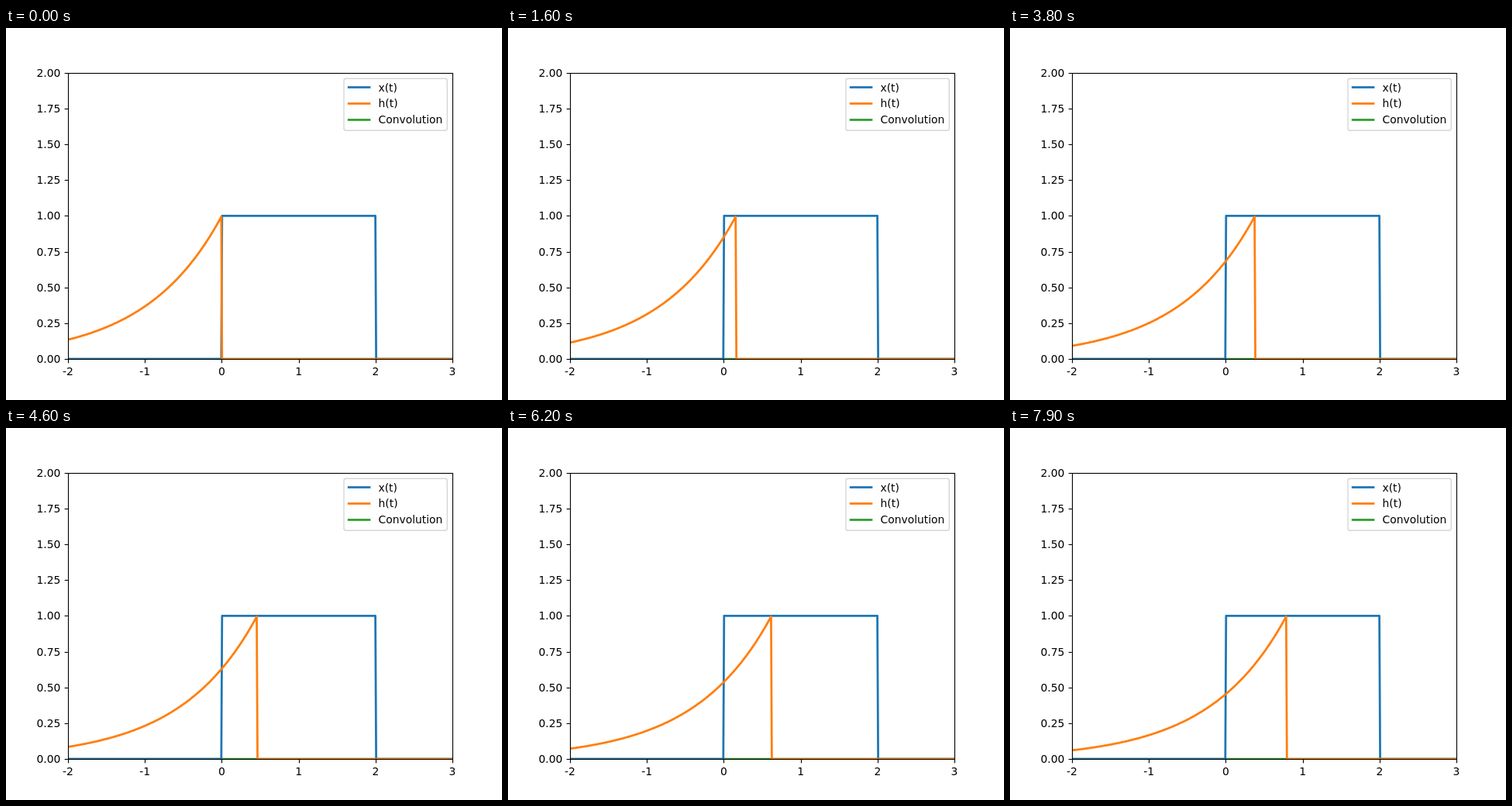
These frames come from a looping animation (640 by 480 pixels, 8 s). An HTML page:

```html
<!DOCTYPE html>
<html lang="en">
<head>
<meta charset="utf-8">
<title>Convolution</title>
<style>
  html, body { margin: 0; width: 100%; height: 100%; overflow: hidden; background: #fff; }
  svg { display: block; width: 640px; height: 480px; }
  text { font: 13.89px "DejaVu Sans", sans-serif; fill: #000; }
  .curve { fill: none; stroke-width: 2.78; stroke-linejoin: round; stroke-linecap: square; }
  .axis { fill: none; stroke: #000; stroke-width: 1.11; }
</style>
</head>
<body>
<svg id="plot" viewBox="0 0 640 480">
  <clipPath id="area"><rect x="80" y="58" width="496" height="370"/></clipPath>
  <g id="curves" clip-path="url(#area)"></g>
  <g id="axes"></g>
  <g id="legend"></g>
</svg>
<script>
const BLUE = '#1f77b4', ORANGE = '#ff7f0e', GREEN = '#2ca02c';
const SAMPLES = 500, STEP_MS = 100, STEPS = 80;
const px = t => 80 + (t + 2) * 99.2;
const py = v => 427.2 - v * 184.8;
const snap = p => Math.round(p) + 0.5;

function add(parent, tag, attrs, content = '') {
  const el = document.createElementNS('http://www.w3.org/2000/svg', tag);
  for (const key in attrs) el.setAttribute(key, attrs[key]);
  el.textContent = content;
  document.getElementById(parent).append(el);
  return el;
}

// Samples a function on the even grid from -2 to 3.
function trace(fn) {
  let d = '';
  for (let i = 0; i < SAMPLES; i++) {
    const t = -2 + 5 * i / (SAMPLES - 1);
    d += (i ? 'L' : 'M') + px(t).toFixed(2) + ' ' + py(fn(t)).toFixed(2);
  }
  return d;
}

const curve = (color, fn) => add('curves', 'path', { class: 'curve', stroke: color, d: trace(fn) });
const pulse = t => (t >= 0 && t <= 2 ? 1 : 0);
const decay = shift => t => (t <= shift ? Math.exp(t - shift) : 0);

curve(GREEN, () => 0);
curve(BLUE, pulse);
const sliding = curve(ORANGE, decay(0));

// Axes
for (let t = -2; t <= 3; t++) {
  const x = px(t);
  add('axes', 'path', { class: 'axis', d: `M${snap(x)} 427.5V432.4` });
  add('axes', 'text', { x, y: 448, 'text-anchor': 'middle' }, t);
}
for (let k = 0; k <= 8; k++) {
  const y = py(k / 4);
  add('axes', 'path', { class: 'axis', d: `M80.5 ${snap(y)}H75.6` });
  add('axes', 'text', { x: 70.3, y: Math.round(y + 5), 'text-anchor': 'end' }, (k / 4).toFixed(2));
}
add('axes', 'rect', { class: 'axis', x: 80.5, y: 58.5, width: 496, height: 369, 'stroke-linecap': 'square' });

// Legend
add('legend', 'rect', {
  x: 436, y: 65.3, width: 133.3, height: 67, rx: 2.8,
  fill: '#fff', 'fill-opacity': 0.8, stroke: '#ccc', 'stroke-opacity': 0.8, 'stroke-width': 1.39
});
[['x(t)', BLUE], ['h(t)', ORANGE], ['Convolution', GREEN]].forEach(([label, color], i) => {
  const y = 76.5 + 21 * i;
  add('legend', 'path', { class: 'curve', stroke: color, d: `M442.2 ${y}H469` });
  add('legend', 'text', { x: 480.5, y: [82, 102, 123][i] }, label);
});

let shown = 0;
function tick() {
  const step = Math.floor(performance.now() / STEP_MS) % STEPS;
  if (step !== shown) {
    shown = step;
    sliding.setAttribute('d', trace(decay(step / 100)));
  }
  requestAnimationFrame(tick);
}
tick();
</script>
</body>
</html>
```
